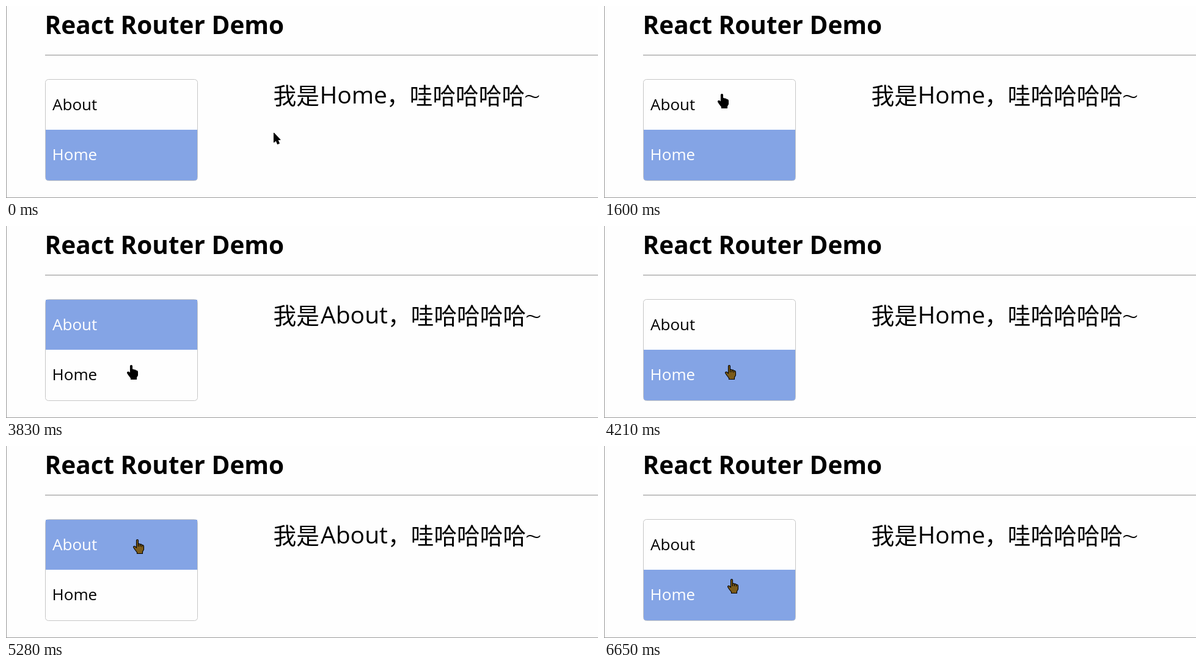
These frames come from a looping animation (969x315 px, 7730 ms). An HTML page with a canvas:

```html
<!DOCTYPE html>
<html lang="zh">
<head>
<meta charset="utf-8">
<title>React Router Demo</title>
<style>
html, body { margin: 0; width: 100%; height: 100%; overflow: hidden; background: #fefefe; }
canvas { display: block; }
</style>
</head>
<body>
<canvas id="stage" width="969" height="315"></canvas>
<script>
const ctx = document.getElementById('stage').getContext('2d');
const LOOP = 7730;
const LATIN = '"Open Sans", "Noto Sans", sans-serif';
const CJK = '"Noto Sans CJK SC", "Noto Sans CJK", sans-serif';
const BLUE = '#84a4e5';

// Tip positions of the pointer; each move runs in discrete steps.
const moves = [
  { from: 840, to: 1600, steps: 18, path: [[438, 208], [415, 75], [310, 95], [193, 144]] },
  { from: 3480, to: 3830, steps: 7, path: line([193, 144], [205, 228]) },
  { from: 4810, to: 5100, steps: 8, path: line([205, 228], [215, 153]) },
  { from: 5940, to: 6310, steps: 10, path: line([215, 153], [209, 218]) }
];
const clicks = [2710, 4210, 5280, 6650];

const arrow = new Path2D('M.5 .5V15.5L4 12.5L6.5 18.5L9.3 17.3L6.8 11.5H10.8Z');
const hand = new Path2D('M5.5 12.5V2Q5.5 .5 7 .5Q8.5 .5 8.5 2V7.5Q10.5 6.8 11.5 8.3' +
  'Q13.5 7.8 14.5 9.3Q17.5 9 17.5 12V17L15.5 20.5V23.5H6.5V21.5L3 17L.6 13.3Q.3 11.2 2.2 11.2Q3.6 11.4 5.5 14Z');
const knuckles = new Path2D('M8.5 7V12M11.5 8.5V12M14.5 9.5V12.5');

function line(a, b) {
  const at = k => a.map((v, i) => v + (b[i] - v) * k);
  return [a, at(1 / 3), at(2 / 3), b];
}

function bezier(p, k) {
  const q = 1 - k;
  return [0, 1].map(i => Math.round(
    q * q * q * p[0][i] + 3 * q * q * k * p[1][i] + 3 * q * k * k * p[2][i] + k * k * k * p[3][i]));
}

function pointerAt(t) {
  let pos = moves[0].path[0];
  for (const { from, to, steps, path } of moves) {
    if (t < from) break;
    const gap = (to - from) / (steps - 1);
    const n = Math.min(steps, Math.floor((t - from) / gap + 1e-6) + 1);
    const k = n / steps;
    pos = bezier(path, k * k * (3 - 2 * k));
  }
  return pos;
}

function rect(color, x, y, w, h) {
  ctx.fillStyle = color;
  ctx.fillRect(x, y, w, h);
}

function text(str, x, y, font, color = '#000') {
  ctx.font = font;
  ctx.fillStyle = color;
  ctx.fillText(str, x, y);
}

function drawItem(label, x, y, active) {
  text(label, x, y, (active ? '500' : '400') + ' 26px ' + LATIN, active ? '#fff' : '#000');
}

function drawList(about) {
  ctx.beginPath();
  ctx.roundRect(64.5, 120.5, 249, 166, 5);
  ctx.strokeStyle = '#c6c6c6';
  ctx.lineWidth = 1;
  ctx.stroke();
  ctx.beginPath();
  ctx.roundRect(65, about ? 121 : 203, 248, about ? 82 : 83, about ? 0 : [0, 0, 4, 4]);
  ctx.fillStyle = BLUE;
  ctx.fill();
  drawItem('About', 76, 171, about);
  drawItem('Home', 75.5, 253, !about);
}

function drawHeading(about) {
  const cjk = '300 37.7px ' + CJK;
  const shift = about ? 2 : 0;
  text('我是', 437.5, 161, cjk);
  text(about ? 'About' : 'Home', about ? 515 : 513.5, 160, '39px ' + LATIN);
  text('，哇哈哈哈哈', 623 + shift, 161, cjk);
  text('~', 847.5 + shift, 165, '300 48px ' + LATIN);
}

// The pointer's inside inverts whatever lies beneath it.
function drawPointer([x, y]) {
  const isHand = x < 314 && y > 120;
  const shape = isHand ? hand : arrow;
  ctx.save();
  ctx.translate(isHand ? x - 7 : x, y);
  ctx.globalCompositeOperation = 'difference';
  ctx.fillStyle = '#fff';
  ctx.fill(shape);
  ctx.globalCompositeOperation = 'source-over';
  ctx.strokeStyle = '#000';
  ctx.lineWidth = 1.1;
  ctx.lineJoin = 'round';
  ctx.stroke(shape);
  if (isHand) ctx.stroke(knuckles);
  ctx.restore();
}

function draw(t) {
  const about = clicks.filter(c => t >= c).length % 2 === 1;
  rect('#fefefe', 0, 0, 969, 315);
  rect('#999', 0, 0, 1, 315);
  rect('#999', 0, 314, 969, 1);
  rect('#959595', 64, 80, 905, 1);
  rect('#f2f2f2', 64, 81, 905, 1);
  text('React Router Demo', 63.5, 46, 'bold 40.5px ' + LATIN);
  drawList(about);
  drawHeading(about);
  drawPointer(pointerAt(t));
}

const start = performance.now();
function tick() {
  draw((performance.now() - start) % LOOP);
  requestAnimationFrame(tick);
}
tick();
</script>
</body>
</html>
```
